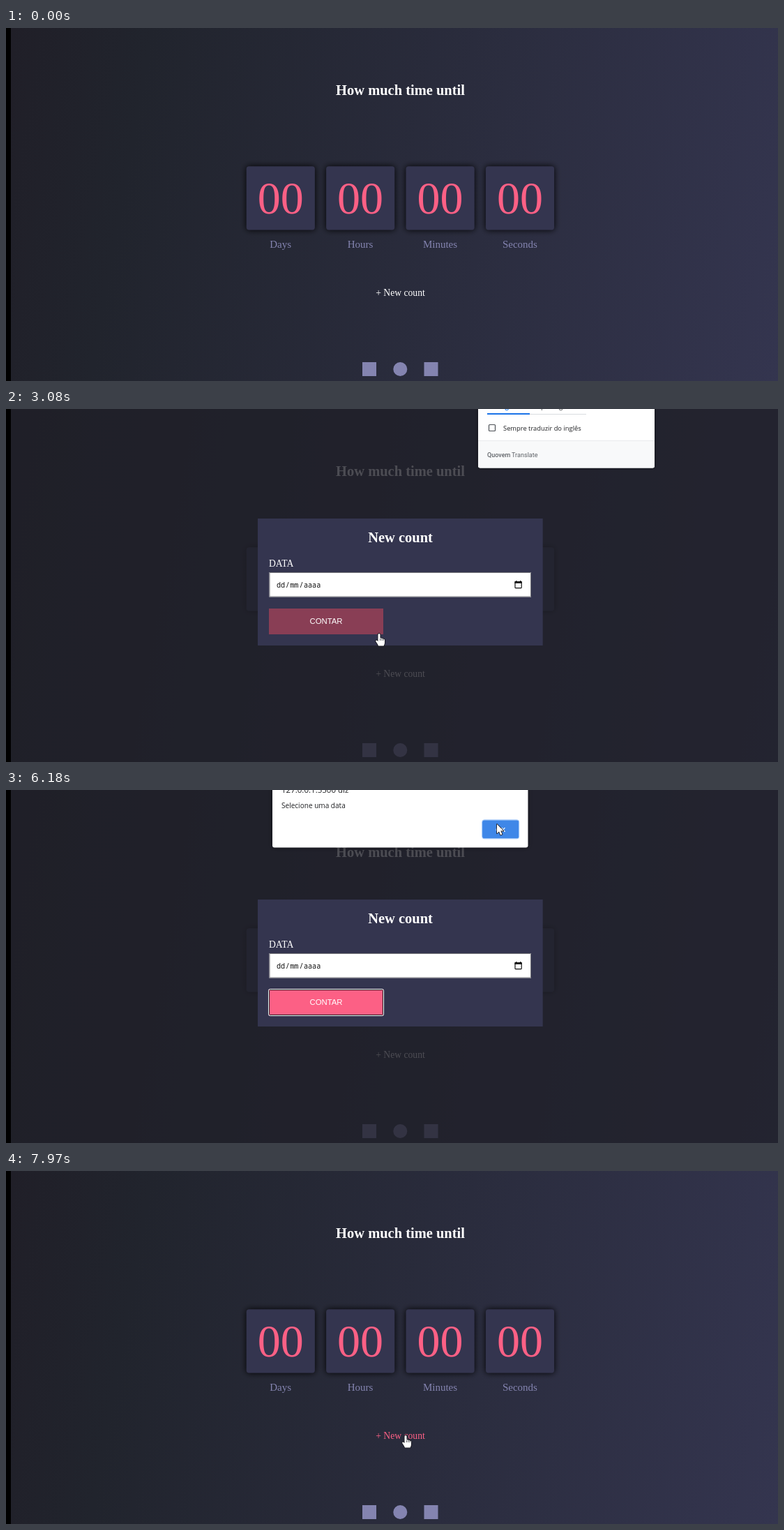
Animation, 1107 px wide and 506 px high, one loop 8000 ms. Source, as an HTML page with a canvas:

```html
<!DOCTYPE html>
<html lang="en">
<head>
<meta charset="utf-8">
<title>Countdown</title>
<style>
html, body { margin: 0; width: 100%; height: 100%; overflow: hidden; background: #000; }
canvas { display: block; width: 100%; height: 100%; }
</style>
</head>
<body>
<canvas id="stage" width="1107" height="506"></canvas>
<script>
const W = 1107, H = 506, LOOP = 8000;
const ctx = document.getElementById('stage').getContext('2d');

const SERIF = '"Liberation Serif", "Times New Roman", serif';
const SANS = '"Liberation Sans", Arial, sans-serif';
const UI = '"Open Sans", "Noto Sans", sans-serif';
const MONO = '"Noto Sans Mono", monospace';
const BRAND = 'Roboto, sans-serif';

const WHITE = [255, 255, 255], PINK = [252, 96, 133], DARK = [32, 31, 40];
const PANEL = '#34354f', LILAC = '#8484b0';

const MODAL_ON = 2000, MODAL_OFF = 6400;

// [time, x, y] of the pointer's hot spot
const PATH = [
  [360, 839, 438], [510, 747, 398], [610, 747, 398], [990, 564, 389],
  [1360, 564, 389], [1800, 562, 382], [2560, 562, 382], [2740, 560, 375],
  [2820, 560, 375], [2960, 535, 322], [3090, 535, 322], [3450, 512, 306],
  [4700, 512, 306], [4850, 668, 97], [5110, 668, 97], [5470, 688, 58],
  [5590, 688, 58], [5730, 704, 49], [6520, 704, 49], [6810, 734, 203],
  [7060, 734, 203], [7340, 617, 322], [7540, 617, 322], [7900, 573, 379]
];

const ARROW = new Path2D('M0 0V13.2L3 10.4L5.2 15.4L7.5 14.4L5.3 9.6H9.4Z');
const HAND = new Path2D('M-1.5 10.5V1.6Q-1.5 0 0 0Q1.5 0 1.5 1.6V6.5Q3 5.8 4 7' +
  'Q5.5 6.4 6.3 7.8Q7.8 7.4 8 9V13Q8 15 6.6 17.5H-1Q-2 15 -4.5 11.5' +
  'Q-5.5 9.8 -4 9.4Q-2.8 9.3 -1.5 11Z');

const ramp = (t, a, b) => Math.min(1, Math.max(0, (t - a) / (b - a)));
const easeOut = p => 1 - (1 - p) * (1 - p);
const within = (t, a, b) => t >= a && t < b;
const mix = (a, b, p) => `rgb(${a.map((v, i) => Math.round(v + (b[i] - v) * p)).join()})`;

function rect(x, y, w, h, color) {
  ctx.fillStyle = color;
  ctx.fillRect(x, y, w, h);
}

function round(x, y, w, h, r, color) {
  ctx.beginPath();
  ctx.roundRect(x, y, w, h, r);
  ctx.fillStyle = color;
  ctx.fill();
}

function outline(x, y, w, h, r, color, width = 1) {
  ctx.beginPath();
  ctx.roundRect(x, y, w, h, r);
  ctx.strokeStyle = color;
  ctx.lineWidth = width;
  ctx.stroke();
}

function text(str, x, y, font, color, align = 'left') {
  ctx.font = font;
  ctx.textAlign = align;
  ctx.fillStyle = color;
  ctx.fillText(str, x, y);
}

// Runs draw with a drop shadow and opacity applied
function layer(alpha, blur, shadow, draw) {
  ctx.save();
  ctx.globalAlpha = alpha;
  ctx.shadowBlur = blur;
  ctx.shadowColor = shadow;
  draw();
  ctx.restore();
}

function backdrop() {
  const a = 100 * Math.PI / 180, dx = Math.sin(a), dy = -Math.cos(a);
  const half = (1100 * dx + H * dy) / 2, cx = 557, cy = H / 2;
  const g = ctx.createLinearGradient(cx - dx * half, cy - dy * half, cx + dx * half, cy + dy * half);
  g.addColorStop(0, '#201f28');
  g.addColorStop(0.17, '#21242d');
  g.addColorStop(1, '#34354f');
  rect(0, 0, W, H, '#000');
  rect(7, 0, W - 7, H, g);
}

function page(t) {
  backdrop();
  text('How much time until', 565.5, 96, `bold 20.48px ${SERIF}`, '#fff', 'center');
  ['Days', 'Hours', 'Minutes', 'Seconds'].forEach((name, i) => {
    const x = 344.7 + i * 114.4, mid = x + 49;
    layer(1, 10, '#000', () => round(x, 198.3, 98.2, 91.2, 4, PANEL));
    text('00', mid, 266, `66px ${SERIF}`, mix(PINK, PINK, 0), 'center');
    text(name, mid, 315, `15px ${SERIF}`, LILAC, 'center');
  });
  const hover = ramp(t, 1450, 1720) - ramp(t, 2110, 2450) + ramp(t, 7740, 7960);
  text('+ New count', 565.5, 384, `13.65px ${SERIF}`, mix(WHITE, PINK, hover), 'center');
  rect(511, 479, 20, 20, LILAC);
  ctx.beginPath();
  ctx.arc(565.3, 489, 10, 0, 7);
  ctx.fillStyle = LILAC;
  ctx.fill();
  rect(599.5, 479, 20, 20, LILAC);
}

function modal(t) {
  rect(7, 0, W - 7, H, 'rgba(32,32,40,0.8)');
  rect(361, 157, 408.7, 182, PANEL);
  text('New count', 565.5, 191, `bold 20.48px ${SERIF}`, '#fff', 'center');
  text('DATA', 377, 226, `13.65px ${SERIF}`, '#fff');

  rect(377.5, 234, 375.5, 35.5, '#fff');
  outline(378, 234.5, 374.5, 34.5, 0, '#77777c');
  const part = (s, x) => text(s, x, 256, `10.1px ${MONO}`, '#111');
  part('dd', 388);
  part('/', 400.7);
  part('mm', 407.3);
  part('/', 420.6);
  part('aaaa', 427);
  outline(730, 247.7, 9.2, 9, 1, '#111', 1.2);
  rect(729.5, 247, 10.2, 2.8, '#111');
  rect(731, 246, 1.3, 2, '#111');
  rect(737, 246, 1.3, 2, '#111');

  rect(377, 286, 164, 37, mix(DARK, PINK, ramp(t, 2935, 3240)));
  if (t >= 3800) {
    outline(377.5, 286.5, 163, 36, 1, '#16161c');
    outline(376.5, 285.5, 165, 38, 2, '#fff');
  }
  text('CONTAR', 459, 308, `11.37px ${SANS}`, '#fff', 'center');
}

function status(t) {
  const alpha = ramp(t, 1480, 1600) - ramp(t, 2380, 2520);
  if (alpha <= 0) return;
  layer(alpha, 0, '#000', () => {
    round(7, 500, 126, 20, [0, 4, 0, 0], '#2b2c33');
    text('127.0.0.1:5500/index.html#', 12, 510.5, `9px ${UI}`, '#e8e8ec');
  });
}

function translateBubble(t) {
  const alpha = ramp(t, 2330, 2440) - ramp(t, 3770, 3850);
  if (alpha <= 0) return;
  layer(alpha, 5, 'rgba(0,0,0,0.5)', () => round(677, -60, 253, 144.5, 3, '#fff'));
  layer(alpha, 0, '#000', () => {
    text('inglês', 720.5, -1.5, `600 10px ${UI}`, '#1a73e8', 'center');
    text('português', 791, -1.5, `10px ${UI}`, '#3c4043', 'center');
    text('×', 886, 0, `12px ${UI}`, '#5f6368', 'center');
    rect(690, 7, 142, 1, '#dadce0');
    rect(690, 6, 61, 2, '#1a73e8');
    outline(692.5, 22.5, 9, 9, 1, '#4d5156', 1.2);
    text('Sempre traduzir do inglês', 713, 30.5, `9.35px ${UI}`, '#202124');
    round(677, 45.5, 253, 39, [0, 0, 3, 3], '#f8f9fa');
    rect(677, 45, 253, 1, '#e8eaed');
    text('Quovem', 690, 68.5, `500 9px ${BRAND}`, '#5f6368');
    text('Translate', 725, 68.5, `9.1px ${BRAND}`, '#5f6368');
  });
}

function alertBox(t) {
  const open = easeOut(ramp(t, 3860, 4130)), shut = ramp(t, 6370, 6560);
  const alpha = open * (1 - shut * shut);
  if (alpha <= 0) return;
  ctx.save();
  ctx.translate(0, -12 * (1 - open) - 14 * shut);
  layer(alpha, 6, 'rgba(0,0,0,0.5)', () => round(382, -60, 366.5, 142.5, 3, '#fff'));
  layer(alpha, 0, '#000', () => {
    text('127.0.0.1:5500 diz', 395, 3.5, `11.5px ${UI}`, '#202124');
    text('Selecione uma data', 395, 26, `10.05px ${UI}`, '#202124');
    round(683, 43.2, 52.3, 26.3, 2.5, within(t, 5400, 6600) ? '#3f87e8' : '#418aec');
    if (t < 6200) outline(682.7, 42.8, 53, 27, 3, '#9cc4f8');
    text('OK', 709, 60, `bold 9.6px ${UI}`, '#fff', 'center');
  });
  ctx.restore();
}

function pointer(t) {
  if (t < PATH[0][0]) return;
  let i = PATH.findIndex(k => k[0] > t);
  if (i < 0) i = PATH.length - 1;
  const [t0, x0, y0] = PATH[i - 1], [t1, x1, y1] = PATH[i];
  const p = easeOut(ramp(t, t0, t1));
  const hand = within(t, 1440, MODAL_ON) || within(t, 2930, 4730) || t >= 7740;
  ctx.save();
  ctx.translate(x0 + (x1 - x0) * p, y0 + (y1 - y0) * p);
  const shape = hand ? HAND : ARROW;
  ctx.lineJoin = 'round';
  ctx.lineWidth = 1.6;
  ctx.strokeStyle = '#15151b';
  ctx.stroke(shape);
  ctx.fillStyle = '#fff';
  ctx.fill(shape);
  if (hand) {
    ctx.lineWidth = 0.7;
    ctx.beginPath();
    for (const x of [1.6, 4, 6.2]) {
      ctx.moveTo(x, 7);
      ctx.lineTo(x, 10);
    }
    ctx.stroke();
  }
  ctx.restore();
}

function frame(now) {
  const t = now % LOOP;
  page(t);
  if (within(t, MODAL_ON, MODAL_OFF)) modal(t);
  status(t);
  translateBubble(t);
  alertBox(t);
  pointer(t);
}

const start = performance.now();
function tick() {
  frame(performance.now() - start);
  requestAnimationFrame(tick);
}
tick();
</script>
</body>
</html>
```
